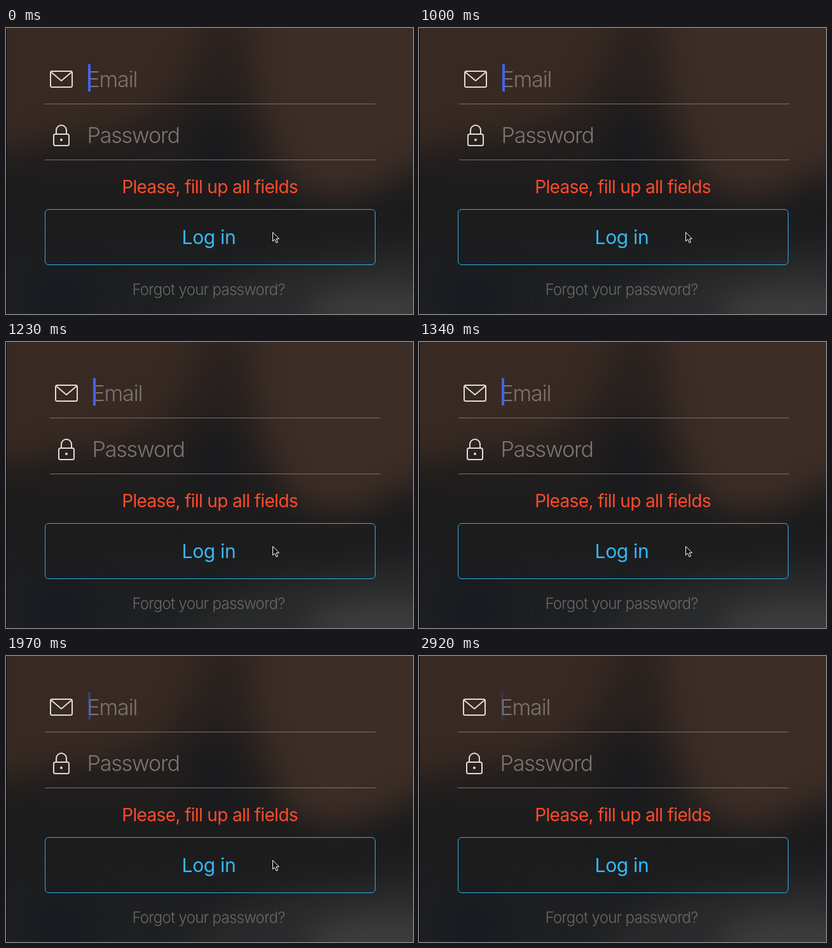
An HTML page that plays this animation: 640 px wide and 450 px high, repeating every 2970 ms.

```html
<!DOCTYPE html>
<html lang="en">
<head>
<meta charset="utf-8">
<title>Login form</title>
<style>
  html, body { margin: 0; width: 100%; height: 100%; overflow: hidden; background: #1b1b1d; }
  svg { display: block; width: 640px; height: 450px; }
  text { font-family: Inter, "Liberation Sans", sans-serif; font-weight: 300; font-optical-sizing: none; }
  .field { font-size: 34px; letter-spacing: -1.15px; fill: #7b7573; }
  .centered { text-anchor: middle; }
  .error { font-size: 28px; font-weight: 400; letter-spacing: -.65px; fill: #ff4b2b; }
  .login { font-size: 30px; font-weight: 400; letter-spacing: -.3px; fill: #35b8f5; }
  .forgot { font-size: 24px; letter-spacing: -.73px; fill: #686868; }
  .icon { fill: none; stroke: #dedbd9; stroke-width: 2; stroke-linejoin: round; }
  .rule { stroke: #7b716c; }
</style>
</head>
<body>
<svg viewBox="0 0 640 450">
  <defs>
    <filter id="soft" x="-50%" y="-50%" width="200%" height="200%" color-interpolation-filters="sRGB">
      <feGaussianBlur stdDeviation="24"/>
    </filter>
    <linearGradient id="base" x2="0" y2="1">
      <stop offset="0" stop-color="#2c2320"/>
      <stop offset=".35" stop-color="#241f1e"/>
      <stop offset=".62" stop-color="#1c1c1d"/>
      <stop offset="1" stop-color="#1e2022"/>
    </linearGradient>
  </defs>

  <rect width="640" height="450" fill="url(#base)"/>
  <g filter="url(#soft)">
    <path d="M-60-60H310Q300 70 240 125Q160 170 90 165Q20 190-60 190Z" fill="#382a23"/>
    <path d="M385-60H720V190Q630 220 570 255Q480 285 435 220Q400 140 390 60Z" fill="#3c2d26"/>
    <ellipse cx="330" cy="200" rx="38" ry="75" fill="#191a1d"/>
    <path d="M250 500Q330 385 460 372Q560 350 720 345V500Z" fill="#292a2b"/>
    <ellipse cx="600" cy="450" rx="130" ry="42" fill="#3d3d3d"/>
    <ellipse cx="85" cy="425" rx="55" ry="45" fill="#171b21"/>
  </g>
  <rect width="1" height="450" fill="#000"/>

  <g id="fields">
    <g class="icon">
      <rect x="70" y="68" width="34" height="25" rx="2.5"/>
      <path d="M71 69.5L87 83L103 69.5"/>
      <rect x="75" y="167" width="24" height="18" rx="2.5"/>
      <path d="M79 167V161a8 8 0 0 1 16 0V167"/>
      <circle cx="87" cy="176" r="2" fill="#dedbd9" stroke="none"/>
    </g>
    <text class="field" x="127.5" y="92.5">Email</text>
    <text class="field" x="127.5" y="180.5">Password</text>
    <path class="rule" d="M61 119.5H581M61 207.5H581"/>
    <rect id="caret" x="129" y="57" width="4" height="43" fill="#4263ee"/>
  </g>

  <text class="centered error" x="320.5" y="260">Please, fill up all fields</text>
  <g id="button">
    <rect x="61.5" y="285.5" width="519" height="87" rx="5.5" fill="none" stroke="#31b0eb"/>
    <text class="centered login" x="319" y="340">Log in</text>
  </g>
  <text class="centered forgot" x="318.5" y="420">Forgot your password?</text>

  <path id="cursor" d="M.5.5V14.5L3.7 11.5L6 17L8.4 16L6.1 10.7H10.4Z" fill="#111" stroke="#fff"/>
</svg>

<script>
  const LOOP = 2970, TICK = 55.5;
  const PRESS = 890, SHAKE = 999, LEAVE = 2330;
  const FADE_OUT = 165, FADE_IN = 90;
  const CARET_HIDDEN = [[470, 800], [1620, 1940], [2620, 2905]];
  const [fields, caret, button, cursor] =
    ['fields', 'caret', 'button', 'cursor'].map(id => document.getElementById(id));

  const clamp = v => Math.min(1, Math.max(0, v));
  const ticksSince = (start, t) => Math.floor((t - start) / TICK);
  const move = (el, x, y) => el.setAttribute('transform', `translate(${x} ${y})`);

  function caretOpacity(t) {
    return Math.min(...CARET_HIDDEN.map(([from, to]) =>
      clamp(Math.max((from - t) / FADE_OUT, (t - to) / FADE_IN))));
  }

  // A damped wave that repeats every three ticks and stops after eight.
  function shakeOffset(t) {
    const n = ticksSince(SHAKE, t);
    if (n < 0 || n >= 8) return 0;
    return Math.round(21 * 0.83 ** n * Math.sin(2 * Math.PI * n / 3 + 0.1));
  }

  function draw(now) {
    const t = now % LOOP;
    move(fields, shakeOffset(t), 0);
    caret.setAttribute('opacity', caretOpacity(t));
    button.setAttribute('opacity', t >= PRESS && t < SHAKE ? 0.6 : 1);

    // The pointer speeds up towards the lower right corner.
    const k = Math.max(0, ticksSince(LEAVE, t) + 1);
    move(cursor, 419 + 65 * k ** 1.1, 321 + 23 * k ** 1.5);
  }

  const start = performance.now();
  function loop() {
    draw(performance.now() - start);
    requestAnimationFrame(loop);
  }
  loop();
</script>
</body>
</html>
```
